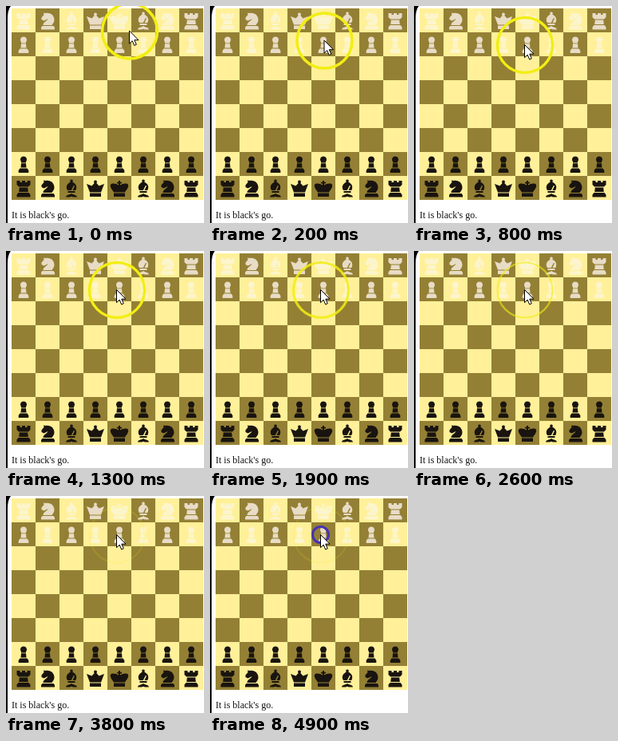
Animation of 248 by 272 pixels, one loop 5000 ms. Source, as an HTML page with a canvas:

```html
<!DOCTYPE html>
<html lang="en">
<head>
<meta charset="utf-8">
<style>
  html, body { margin: 0; width: 248px; height: 272px; overflow: hidden; background: #fff; }
  canvas { display: block; position: absolute; }
  p { position: absolute; left: 7px; top: 255px; margin: 0; font: 12px/14px "Liberation Serif", serif; color: #111; white-space: nowrap; }
</style>
</head>
<body>
<canvas id="stage" width="248" height="272"></canvas>
<p>It is black's go.</p>
<script>
const ctx = document.getElementById('stage').getContext('2d');
const LOOP = 5000, STEP = 100, CELL = 30, LEFT = 7, TOP = 3;

// Piece outlines within one 30 px square
const shapes = {
  pawn: 'M15 5.5a4 4 0 0 1 3 6.700v1.300h-6v-1.300a4 4 0 0 1 3-6.700zM12 14.300h6l.5 5.200h-7zM10.500 20.500h9l1.800 2.500v3H8.700v-3z',
  rook: 'M6.500 6h4v2h2.500V6h4v2h2.500V6h4v5l-2.500 2.500H9L6.500 11zM9.800 14.500h10.400l.6 5.500H9.200zM8.500 21h13l2 2.500v3h-17v-3z',
  knight: 'M10 5.500l2.500.5c7-1 11 3.500 11 8.500 0 3-2 4.500-3 6.500H9.500c0-4 5-5 6-8l-5 2.500-3-1.500v-2.500l3-3.500zM8.500 22h14l1.500 2v2.500H7V24z',
  bishop: 'M15 4.500a1.700 1.700 0 0 1 1.200 3c5 2.500 6.300 6.500 4 10.500h-3.700l2.500-5.500-1.200-.6-3 6.100H10c-2.500-4-1-8 3.800-10.500a1.700 1.700 0 0 1 1.200-3zM10.500 19h9v2h-9zM8 26.500c.5-3 4-2.500 7-4.500 3 2 6.500 1.500 7 4.500h-5l-2-.8-2 .8z',
  queen: 'M15 5.500a2 2 0 0 1 1.300 3.500l3.200 3.500 6.500-2.500-4 10.500H8L4 10l6.500 2.500L13.700 9A2 2 0 0 1 15 5.500zM8 21.500h14v4.500H8z',
  king: 'M14 6h2v1.800h2v1.800h-2v2c3-2 8.500-3 10-.6 1 3.500-2 6-4 9.500H8c-2-3.500-5-6-4-9.500 1.500-2.400 7-1.400 10 .6v-2h-2V7.800h2zM8 21.500h14v4.500H8z'
};
const paths = Object.fromEntries(Object.entries(shapes).map(([k, d]) => [k, new Path2D(d)]));
const backRow = ['rook', 'knight', 'bishop', 'queen', 'king', 'bishop', 'knight', 'rook'];
const arrow = new Path2D('M0 0V16.200L3.700 12.700 6.200 18.500 8.800 17.300 6.300 11.700H11.500z');
const corner = new Path2D('M0 272V0H6Q2 5 2 16V272z');

// Keys are [time, value, value, ...] with linear motion between them
function track(keys, t) {
  let i = 1;
  while (i < keys.length - 1 && t > keys[i][0]) i++;
  const a = keys[i - 1], b = keys[i];
  const k = Math.min(1, Math.max(0, (t - a[0]) / (b[0] - a[0])));
  return a.slice(1).map((v, n) => v + (b[n + 1] - v) * k);
}
const pointer = [[0, 154.5, 31], [200, 143, 43], [400, 136.5, 48.5], [700, 138.5, 48.5]];
const halo = [[0, 1, 3.6], [1300, 1, 3.4], [1900, 0.85, 3.2], [2600, 0.6, 2.2], [3400, 0.16, 1.5]];

function drawBoard() {
  for (let row = 0; row < 8; row++) {
    for (let col = 0; col < 8; col++) {
      const dark = (row + col) % 2;
      ctx.save();
      ctx.translate(LEFT + col * CELL, TOP + row * CELL);
      ctx.fillStyle = dark ? '#948034' : '#fff099';
      ctx.fillRect(0, 0, CELL, CELL);
      const name = row === 0 || row === 7 ? backRow[col] : row === 1 || row === 6 ? 'pawn' : null;
      if (name) {
        ctx.fillStyle = row > 3 ? '#19140f' : dark ? '#e8dcc6' : '#fcf5cc';
        ctx.fill(paths[name]);
      }
      ctx.restore();
    }
  }
}

function ring(x, y, r, color, width, alpha = 1) {
  ctx.globalAlpha = alpha;
  ctx.strokeStyle = color;
  ctx.lineWidth = width;
  ctx.beginPath();
  ctx.arc(x, y, r, 0, Math.PI * 2);
  ctx.stroke();
  ctx.globalAlpha = 1;
}

function draw(now) {
  const t = Math.floor(now % LOOP / STEP) * STEP;
  const [x, y] = track(pointer, t);
  const [alpha, width] = track(halo, t);

  ctx.fillStyle = '#fff';
  ctx.fillRect(0, 0, 248, 272);
  drawBoard();
  ctx.fillStyle = '#000';
  ctx.fill(corner);
  ring(x + 0.5, y + 0.5, 34.5, '#f2ee12', width, alpha);
  if (t >= 4500) ring(x, y, 2 + (t - 4500) / 50, '#4632b4', 3);

  ctx.save();
  ctx.translate(x, y);
  ctx.fillStyle = '#fff';
  ctx.fill(arrow);
  ctx.strokeStyle = '#000';
  ctx.lineWidth = 1;
  ctx.stroke(arrow);
  ctx.restore();
  requestAnimationFrame(draw);
}
requestAnimationFrame(draw);
</script>
</body>
</html>
```
